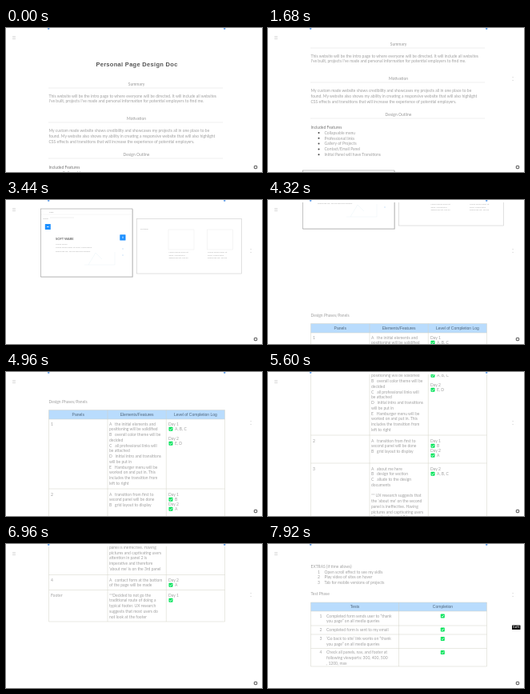
An HTML page that plays this animation: 320x180 px, repeating every 8 s.

```html
<!DOCTYPE html>
<html lang="en">
<head>
<meta charset="utf-8">
<title>Design document</title>
<style>
  html, body { margin: 0; width: 100%; height: 100%; overflow: hidden; background: #fff; }
  svg { display: block; width: 100vw; height: 100vh; }
  text { font: 5px Lato, sans-serif; fill: #a0a0a0; white-space: pre; }
  .title { font: bold 7.5px "Liberation Sans", Arial, sans-serif; letter-spacing: .3px; fill: #555; }
  .head { font: 5px "Liberation Sans", Arial, sans-serif; fill: #50667c; }
  .section { fill: #999; }
  .strong { fill: #777; }
  .tiny { font-size: 2.6px; fill: #aaa; }
  .name { font: bold 4px Lato, sans-serif; fill: #666; }
  .tip { font: bold 3px Lato, sans-serif; fill: #fff; }
</style>
</head>
<body>
<svg id="stage" viewBox="0 0 320 180">
  <defs><clipPath id="page"><rect y="3" width="320" height="177"/></clipPath></defs>
  <g clip-path="url(#page)"><g id="doc"></g></g>
  <g id="chrome">
    <path d="M52 0h2.4v1.2l-1.2 1l-1.2-1zM272 0h2.4v1.2l-1.2 1l-1.2-1z" fill="#6ea6ea"/>
    <path d="M8 10.5h4M8 12.2h4M8 13.9h4" stroke="#ccc" stroke-width=".6"/>
    <rect x="310.3" y="172.3" width="3.4" height="3.4" rx=".6" fill="#fff" stroke="#555" stroke-width="1"/>
    <path id="margin" d="M305.6 61.5h1M305.6 65.5h1" stroke="#ccc" stroke-width="1"/>
    <g id="tip"><rect x="305" y="101.5" width="10.5" height="5.5" rx=".5" fill="#111"/>
      <text class="tip" x="310.2" y="105.3" text-anchor="middle">5 of 5</text></g>
  </g>
</svg>
<script>
const doc = document.getElementById('doc');

function add(tag, attrs, content) {
  const el = document.createElementNS('http://www.w3.org/2000/svg', tag);
  for (const key in attrs) el.setAttribute(key, attrs[key]);
  if (content) el.textContent = content;
  doc.append(el);
}
// y is the middle of the x-height
const text = (x, y, s, cls = '', anchor = 'start') =>
  add('text', { x, y: y + 1.7, class: cls, 'text-anchor': anchor }, s);
const lines = (x, y, list, cls, step = 6.75) => list.forEach((s, i) => s && text(x, y + i * step, s, cls));
const rect = (x, y, width, height, fill, stroke = 'none', rx = 0) =>
  add('rect', { x, y, width, height, fill, stroke, rx, 'stroke-width': .6 });
const path = (d, stroke, width = .5) => add('path', { d, stroke, 'stroke-width': width, fill: 'none' });

function section(y, s) {
  text(163, y, s, 'section', 'middle');
  path(`M53 ${y + 5}H271`, '#ddd');
}
function check(x, y) {
  rect(x - 2.5, y - 2.5, 5, 5, '#08e45c', 'none', .8);
  path(`M${x - 1.4} ${y}l1 1.2l1.9-2.3`, '#fff', .8);
}
function table(columns, rows, headings) {
  const left = columns[0], right = columns[columns.length - 1];
  const top = rows[0], bottom = rows[rows.length - 1];
  rect(left, top, right - left, rows[1] - top, '#b9dcfd');
  headings.forEach((s, i) => text((columns[i] + columns[i + 1]) / 2, (top + rows[1]) / 2, s, 'head', 'middle'));
  rows.forEach(y => path(`M${left} ${y}H${right}`, '#d2d2c6'));
  columns.forEach(x => path(`M${x} ${top}V${bottom}`, '#d2d2c6'));
}
function log(y, day, done) {
  text(203, y, 'Day ' + day);
  check(206, y + 6.3);
  text(211, y + 6.3, done);
}

text(163.5, 46.3, 'Personal Page Design Doc', 'title', 'middle');
section(70, 'Summary');
lines(53.5, 84.8, [
  'This website will be the intro page to where everyone will be directed. It will include all websites',
  "I've built, projects I've made and personal information for potential employers to find me."]);
section(113, 'Motivation');
lines(53.5, 128.5, [
  'My custom made website shows credibility and showcases my projects all in one place to be',
  'found. My website also shows my ability in creating a responsive website that will also highlight',
  'CSS effects and transitions that will increase the experience of potential employers.']);
section(158, 'Design Outline');
text(53.5, 174, 'Included Features', 'strong');
['Collapsable menu', 'Professional links', 'Gallery of Projects', 'Contact/Email Panel', 'Initial Panel will have Transitions']
  .forEach((s, i) => {
    const y = 181 + i * 6.8;
    add('circle', { cx: 63.5, cy: y, r: 1, fill: '#444' });
    text(70.5, y, s);
  });

// Mock-up panels
rect(44, 228.7, 115, 85, '#ddd');
rect(43.5, 228, 114.5, 85, '#fff', '#999');
path('M44 235h114', '#eee');
text(54, 231.5, 'Page', 'tiny');
text(46, 239, 'Home', 'tiny');
path('M55 239h30', '#ddd');
rect(48.8, 247, 7, 7, '#1e90ff', 'none', .5);
rect(142.3, 260.2, 7.2, 7.2, '#1e90ff', 'none', .5);
path('M51 250.5h2.6', '#fff', .8);
path('M146 262.5v2.6', '#fff', .8);
text(62, 265, 'SOFT WARE', 'name');
lines(62, 271, ['Lorem ipsum', 'Lorem ipsum dolor sit amet, consectetur', 'adipiscing elit, sed do eiusmod tempor'], 'tiny', 4.4);
path('M98 298h38v-16M103 298l9-15l8 8', '#e9f3f7');
path('M145.5 278h1M145.5 286h1', '#9bc8ef', 1);
rect(163.3, 240.5, 131, 68.5, '#fff', '#ccc');
text(168, 252, 'Portfolio', 'tiny');
[203, 251.5].forEach(x => {
  rect(x, 254, 32, 25, '#fff', '#eee');
  lines(x + .5, 281.5, ['Lorem ipsum dolor sit', 'amet, consectetur', 'adipiscing elit, sed do'], 'tiny', 3.5);
});

text(53.5, 421, 'Design Phases/Panels');
table([53.5, 127, 200.3, 273.5], [431.5, 443, 530, 565, 653.5, 672.5, 712],
  ['Panels', 'Elements/Features', 'Level of Completion Log']);
[['1', 449], ['2', 537], ['3', 572], ['4', 660], ['Footer', 679]].forEach(([s, y]) => text(56, y, s));
lines(129, 449, ['A   the initial elements and', 'positioning will be solidified', 'B   overall color theme will be', 'decided',
  'C   all professional links will', 'be attached', 'D   initial intro and transitions', 'will be put in',
  'E   Hamburger menu will be', 'worked on and put in. This', 'includes the transition from', 'left to right']);
lines(129, 537, ['A   transition from first to', 'second panel will be done', 'B   grid layout to display']);
lines(129, 572, ['A   about me here', 'B   design for section', 'C   allude to the design', 'documents', '',
  '** UX research suggests that', "the 'about me' on the second", 'panel is ineffective. Having',
  'pictures and captivating users', 'attention in panel 2 is', 'imperative and therefore', "'about me' is on the 3rd panel"]);
lines(129, 660, ['A   contact form at the bottom', 'of the page will be made']);
lines(129, 679, ['**Decided to not go the', 'traditional route of doing a', 'typical footer. UX research',
  'suggests that most users do', 'not look at the footer']);
log(449, 1, 'A, B, C');
log(467, 2, 'E, D');
log(537, 1, 'B');
log(549, 2, 'A');
log(572, 2, 'A, B, C');
log(660, 2, 'A');
log(679, 1, '');

text(53.5, 813, 'EXTRAS (if time allows)');
['Open scroll effect to see my skills', 'Play video of sites on hover', 'Tab for mobile versions of projects']
  .forEach((s, i) => {
    text(62, 819.8 + i * 6.8, String(i + 1));
    text(70.5, 819.8 + i * 6.8, s);
  });
text(53.5, 847, 'Test Phase');
table([53.5, 163.5, 273.5], [858, 869, 887, 898, 915.5, 938], ['Tests', 'Completion']);
[[875, 'Completed form sends user to “thank', 'you page” on all media queries'],
 [892, 'Completed form is sent to my email'],
 [903.5, '‘Go back to site’ link works on “thank', 'you page” on all media queries'],
 [920.5, 'Check all panels, nav, and footer at', 'following viewports: 300, 400, 500', ', 1200, max']]
  .forEach(([y, ...list], i) => {
    text(64.5, y, String(i + 1));
    lines(73, y, list);
    check(218.3, y);
  });

// Scroll keys: [ms, offset]
const keys = [[0, 0], [640, 0], [1520, 26], [1680, 50], [1760, 50], [2080, 100], [2320, 100], [2640, 150],
  [3040, 182], [3520, 224], [3680, 232], [4000, 272], [4240, 272], [4320, 277], [4560, 352], [4720, 367],
  [4800, 367], [5120, 400], [5600, 451], [5680, 451], [6080, 530], [6320, 530], [6640, 585],
  [6720, 585], [6960, 615], [7200, 680], [7280, 680], [7680, 785], [8000, 785]];

function scrollAt(t) {
  const i = keys.findIndex(key => key[0] > t);
  const [t0, y0] = keys[i - 1], [t1, y1] = keys[i];
  return y0 + (y1 - y0) * (t - t0) / (t1 - t0);
}
const show = (id, on) => document.getElementById(id).setAttribute('visibility', on ? 'visible' : 'hidden');
const start = performance.now();

function draw(now) {
  const t = Math.floor(Math.max(0, now - start) % 8000 / 80) * 80;
  doc.setAttribute('transform', `translate(0 ${-Math.round(scrollAt(t))})`);
  show('margin', t >= 1600);
  show('tip', t >= 7840);
  requestAnimationFrame(draw);
}
draw(start);
</script>
</body>
</html>
```
